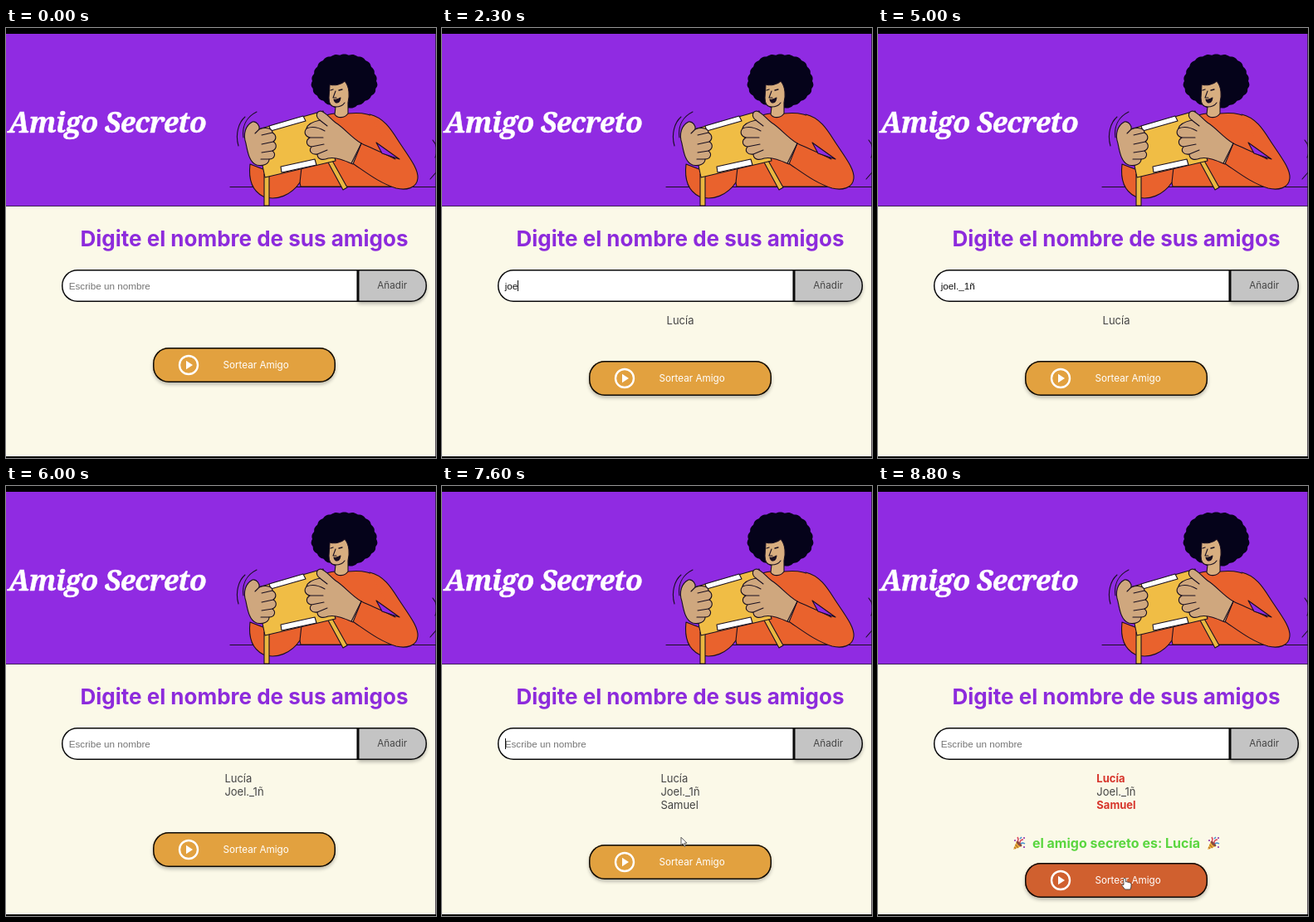
Recreate the animation shown at these times as an HTML page. Size 518x518 px, loop 8900 ms.

```html
<!DOCTYPE html>
<html lang="es">
<head>
<meta charset="utf-8">
<title>Amigo Secreto</title>
<style>
html, body { margin: 0; width: 100%; height: 100%; overflow: hidden; background: #000; }
#stage {
  --edge: inset 0 0 0 1.5px #0a0a0a;
  --drop: 0 2.5px 4px #0004;
  position: relative; width: 518px; height: 518px; overflow: hidden; background: #fbf9e8;
  font-family: Inter, sans-serif; font-optical-sizing: none;
}
#stage > * { position: absolute; box-sizing: border-box; }
#art { left: 0; top: 0; }
h1 {
  left: 67px; top: 239px; width: 440px; margin: 0; text-align: center; white-space: nowrap;
  font-size: 26px; line-height: 30px; font-weight: 700; color: #8d2bdc;
}
#field {
  left: 67px; top: 291px; width: 357px; height: 39px; padding-left: 8.7px;
  border-radius: 19px 0 0 19px; background: #fff; box-shadow: var(--edge);
  font: 11.7px/39px "Liberation Sans", Arial, sans-serif; color: #111; white-space: pre;
}
#caret { position: absolute; top: 13px; width: 1px; height: 13px; background: #111; }
#hint { color: #757575; }
#add {
  left: 424px; top: 291px; width: 82.5px; height: 39px; text-align: center;
  border-radius: 0 19px 19px 0; background: #c4c4c4; box-shadow: var(--edge), var(--drop);
  font-size: 11.7px; line-height: 39px; color: #464646;
}
#list {
  left: 67px; top: 345px; width: 440px; display: flex; justify-content: center;
  font-size: 13px; line-height: 15.8px; color: #444;
}
#list .out { color: #d7352b; font-weight: 700; }
#result {
  left: 67px; top: 420px; width: 440px; display: flex; justify-content: center; align-items: center; gap: 7.5px;
  font-size: 16px; line-height: 20px; font-weight: 700; color: #5ad63f; white-space: nowrap;
}
#draw {
  left: 177px; width: 220px; height: 42px; padding-left: 84.5px;
  border-radius: 19px; box-shadow: var(--edge), var(--drop);
  font-size: 11.7px; line-height: 42px; color: #fff;
}
#draw svg { position: absolute; left: 30px; top: 8px; }
#arrow, #hand { left: 0; top: 0; overflow: visible; }
</style>
</head>
<body>
<div id="stage">
  <svg id="art" width="518" height="518">
    <rect y="7" width="518" height="208" fill="#902be2"/>
    <rect width="518" height="7"/>
    <path d="M0 214.5H518M517.500 7V518" stroke="#241b2c" stroke-opacity=".75" fill="none"/>
    <rect y="516" width="518" height="2"/>
    <text x="3" y="126" fill="#fff" stroke="#fff" stroke-width=".5" font-family="Merriweather, Noto Serif, serif" font-size="34" letter-spacing="-.75" font-weight="700" font-style="italic">Amigo Secreto</text>
    <g stroke="#190f20" stroke-width="1.1" fill="none" stroke-linejoin="round" stroke-linecap="round">
      <path d="M270 191.5H518"/>
      <path d="M280 142C276 128 280 114 288 107M286 132C284 118 290 107 302 101M514 135C519 141 520 149 517 156M511 182L518 174"/>
      <path id="hair" fill="#05031a" stroke="none"/>
      <path fill="#e9622d" d="M396 103C386 104 379 107 373 118L350 168L355 191H462L470 140C456 108 440 100 412 103Z"/>
      <path fill="#d8ae80" d="M390 68C396 70 404 68 408 64C414 71 414 82 412 90L412 103C408 109 399 109 396 104L397 95C391 95 389 91 389 84Z"/>
      <path d="M397 95C402 95 406 93 408 90M397 76L394 84H398"/>
      <path d="M391 75L394 74M401 75L405 74" stroke-width="1.3"/>
      <path fill="#190f20" d="M395 86Q399 87 403 84Q402 90 399 90Q396 90 395 86Z"/>
      <path fill="#e9622d" d="M438 104C456 108 465 124 474 138C486 156 497 170 496 181C495 193 482 196 470 193C450 187 434 174 416 162L428 139C443 146 456 151 469 158"/>
      <path fill="#902be2" d="M446 138L474 158L453 151Z"/>
      <path fill="#e9622d" d="M294 164C292 181 296 196 310 203C326 209 344 201 354 186L356 168L320 174Z"/>
      <path fill="#eab740" d="M311 176H317V214H311ZM387 160L392 158L411 192L406 195Z"/>
      <path fill="#f0bd45" d="M300 123L382 100L397 160L312 180Z"/>
      <path fill="#fff" d="M317 118L358 106L361 112L319 124ZM331 167L372 158L374 165L332 174Z"/>
      <path fill="#cfa77e" d="M289 139C285 127 289 117 297 113C302 112 306 118 305 122C314 119 321 121 321 126C326 129 326 134 322 137C327 140 326 146 321 148C326 152 323 158 317 158C317 164 309 167 302 165C293 162 291 149 289 139Z"/>
      <path d="M305 122L300 127M321 126L308 129M322 137L308 140M321 148L308 150M317 158L307 158"/>
      <path fill="#cfa77e" d="M428 139C416 132 407 120 397 114C390 109 385 101 379 100C373 101 373 107 378 111C369 113 363 116 362 121C358 126 361 131 366 132C360 136 362 142 368 143C364 148 368 153 375 152C375 158 381 160 388 157C398 155 409 160 418 164Z"/>
      <path d="M378 111L387 118M362 121C369 118 377 120 384 124M366 132L382 132M368 143L383 140M375 152L387 147M428 139L416 163"/>
    </g>
  </svg>
  <h1>Digite el nombre de sus amigos</h1>
  <div id="field"><span id="typed"></span><i id="caret"></i><span id="hint">Escribe un nombre</span></div>
  <div id="add">Añadir</div>
  <div id="list"><div id="names"></div></div>
  <div id="result"></div>
  <div id="draw">
    <svg width="26" height="26"><circle cx="13" cy="13" r="11" fill="none" stroke="#fff" stroke-width="2.4"/><path d="M10 7.800L18 13L10 18.200Z" fill="#fff"/></svg>
    Sortear Amigo
  </div>
  <svg id="arrow" width="9" height="13"><path d="M0 0V9.500L2.300 7.500L4 11L5.500 10.300L4 7H7Z" fill="#fff" stroke="#333" stroke-width=".8"/></svg>
  <svg id="hand" width="12" height="14"><path d="M-1 0Q.3-1.200 1.500 0V4Q3 3 4 4.400Q5.500 3.800 6.200 5Q8 4.700 8 6.500V9Q7.800 11 6.800 13H.5L-3.300 8Q-3.600 6-1 7.500Z" fill="#fff" stroke="#333" stroke-width=".8"/></svg>
</div>
<script>
const LOOP = 8900;
const people = ['Lucía', 'Joel._1ñ', 'Samuel'];

// time, typed text, names listed, caret shown
const steps = [
  [0, '', 0, 0], [100, '', 0, 1], [300, 'l', 0, 1], [500, 'lu', 0, 1], [700, 'luc', 0, 1],
  [900, 'lucí', 0, 1], [1100, 'lucía', 0, 1], [1500, '', 1, 1], [1800, '', 1, 0], [2000, '', 1, 1],
  [2100, 'j', 1, 1], [2200, 'jo', 1, 1], [2300, 'joe', 1, 1], [2400, 'joel', 1, 1],
  [2800, 'joel', 1, 0], [3100, 'joel', 1, 1], [3400, 'joel', 1, 0],
  [3700, 'joel.', 1, 1], [3800, 'joel._', 1, 1], [4000, 'joel._', 1, 0], [4200, 'joel._1', 1, 1],
  [4500, 'joel._1', 1, 0], [4700, 'joel._1ñ', 1, 0],
  [5100, '', 2, 0], [5200, '', 2, 1], [5500, '', 2, 0], [5800, '', 2, 1], [6000, '', 2, 0],
  [6100, 's', 2, 1], [6200, 'sa', 2, 1], [6300, 'sam', 2, 1], [6350, 'samu', 2, 1],
  [6400, 'samue', 2, 1], [6500, 'samuel', 2, 1],
  [6800, '', 3, 1], [7000, '', 3, 0], [7300, '', 3, 1], [7700, '', 3, 0]
];
// time, index drawn
const draws = [[7800, 2], [8500, 0]];
// time, pointer x, y
const path = [[7300, 292, 384], [7600, 288, 423], [7700, 288, 444], [8100, 288, 444], [8400, 297, 473], [8900, 297, 473]];

const $ = id => document.getElementById(id);
const last = (rows, t) => rows.filter(r => r[0] <= t).pop();

function hairPath() {
  const pts = [];
  for (let i = 0; i <= 180; i++) {
    const a = i * Math.PI / 90, bump = 1.3 * Math.abs(Math.sin(a * 11)) + Math.sin(a * 5) * .7;
    pts.push((407.5 + (38.5 + bump) * Math.cos(a)).toFixed(1) + ' ' + (64 + (32 + bump) * Math.sin(a)).toFixed(1));
  }
  return 'M' + pts.join('L') + 'Z';
}
$('hair').setAttribute('d', hairPath());

const popper = `<svg width="16" height="17" viewBox="0 0 16 17">
  <path d="M1 16L5 6Q10 8 11 12Z" fill="#eeb23c"/>
  <path d="M3.500 10L7 14M2 13L4 15" stroke="#b9772d" stroke-width="1.300"/>
  <ellipse cx="8" cy="9" rx="1.800" ry="4.200" transform="rotate(-45 8 9)" fill="#8a4a42"/>
  <path d="M6 6Q8 4 6 1M9 8Q9 4 13 4" fill="none" stroke="#d8435b" stroke-width="1.500"/>
  <path d="M10 9Q12 7 15 9M9 3L11 1" fill="none" stroke="#438fd0" stroke-width="1.500"/>
  <path d="M2 4h2v2H2ZM13 12h2v2h-2ZM13 1h2v2h-2Z" fill="#a65bb5"/>
</svg>`;

function pointerAt(t) {
  const i = path.findIndex(p => p[0] > t);
  if (i < 1) return null;
  const [a, b] = [path[i - 1], path[i]], k = (t - a[0]) / (b[0] - a[0]);
  return { x: a[1] + (b[1] - a[1]) * k, y: a[2] + (b[2] - a[2]) * k };
}

function place(el, p, show) {
  el.style.display = show ? '' : 'none';
  if (show) el.style.transform = `translate(${p.x}px, ${p.y}px)`;
}

let shown = '';
function renderText(typed, count, caret, drawn) {
  const key = [typed, count, caret, drawn].join('|');
  if (key === shown) return;
  shown = key;
  $('typed').textContent = typed;
  $('hint').style.display = typed ? 'none' : '';
  $('caret').style.visibility = caret ? 'visible' : 'hidden';
  $('names').innerHTML = people.slice(0, count)
    .map((n, i) => `<div class="${drawn.includes(i) ? 'out' : ''}">${n}</div>`).join('');
  $('result').innerHTML = drawn.length
    ? `${popper}<span>el amigo secreto es: ${people[drawn[drawn.length - 1]]}</span>${popper}` : '';
}

function render(t) {
  const [, typed, count, caret] = last(steps, t);
  const drawn = draws.filter(d => d[0] <= t).map(d => d[1]);
  renderText(typed, count, caret, drawn);

  const top = 385 + Math.round(count * 15.8) + (drawn.length ? 22 : 0);
  const p = pointerAt(t);
  const hover = !!p && p.y > top && p.y < top + 42;
  $('draw').style.top = top + 'px';
  $('draw').style.background = hover ? '#d0602f' : '#e2a13f';
  place($('arrow'), p, p && !hover);
  place($('hand'), p, hover);
}

const start = performance.now();
function tick() {
  render((performance.now() - start) % LOOP);
  requestAnimationFrame(tick);
}
tick();
</script>
</body>
</html>
```
